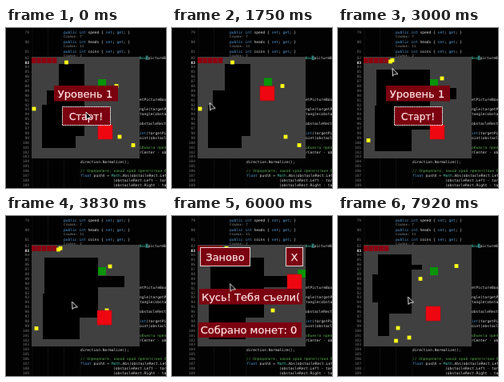
These frames come from a looping animation (200 px wide and 200 px high, 8 s). An HTML page:

```html
<!DOCTYPE html>
<html lang="ru">
<head>
<meta charset="utf-8">
<style>
html, body { margin: 0; width: 100%; height: 100%; overflow: hidden; background: #020202; }
svg { display: block; width: 100vw; height: 100vh; }
.code { font: 4.6px "DejaVu Sans Mono", monospace; fill: #d8d8d8; white-space: pre; }
.lens { font-size: 4.2px; fill: #8c8c8c; }
.num { fill: #777; text-anchor: end; }
.num.current { fill: #fff; font-weight: bold; }
.key { fill: #569cd6; }
.type { fill: #4ec9b0; }
.note { fill: #57a64a; }
.guide { stroke: #333; stroke-width: .5; stroke-dasharray: 1 1; }
.wall { fill: #000; }
.coin { fill: #ffff18; }
.panel { fill: #7b0010; }
.button { stroke: #e8d0d4; stroke-width: 1; }
.focus { stroke: #fff; stroke-dasharray: 1.5 .7; }
.label { font: 13px "DejaVu Sans", sans-serif; fill: #ffdfe2; stroke: #ffdfe2; stroke-width: .25; text-anchor: middle; }

.timed { animation: 8s step-end infinite; }
.moving { animation: 8s linear infinite; }
#mapA { animation-name: mapA; }
#mapB { animation-name: mapB; }
#mapC { animation-name: mapC; }
#taken { animation-name: taken; }
#intro { animation-name: intro; }
#lost { animation-name: lost; }
#player { animation-name: player; }
#enemy { animation-name: enemy; }
#cursor { animation-name: cursor; animation-timing-function: ease-in-out; }

@keyframes mapA { 0% { visibility: visible } 36%, 100% { visibility: hidden } }
@keyframes mapB { 0% { visibility: hidden } 36% { visibility: visible } 82.75%, 100% { visibility: hidden } }
@keyframes mapC { 0% { visibility: hidden } 82.75%, 100% { visibility: visible } }
@keyframes taken { 0% { opacity: 1 } 54.4%, 100% { opacity: 0 } }
@keyframes intro {
  0%, 36%, 82.75% { visibility: visible }
  5%, 46.875%, 95%, 100% { visibility: hidden }
}
@keyframes lost {
  0%, 36%, 82.75%, 100% { visibility: hidden }
  23.125%, 70% { visibility: visible }
}
@keyframes player {
  0%, 21.5% { transform: translate(120px, 69px) }
  23.1%, 35.99% { transform: translate(120px, 63px) }
  36%, 49% { transform: translate(120px, 69px) }
  54% { transform: translate(129px, 69px) }
  63%, 82.74% { transform: translate(162.5px, 72px) }
  82.75%, 100% { transform: translate(120px, 69px) }
}
@keyframes enemy {
  0%, 5% { transform: translate(124px, 130px) }
  12.5% { transform: translate(119px, 110px) }
  23.1%, 35.99% { transform: translate(119px, 78px) }
  36%, 46.8% { transform: translate(124px, 130px) }
  47.9% { transform: translate(123px, 127px) }
  55% { transform: translate(128px, 112px) }
  64.6% { transform: translate(142.5px, 98px) }
  70%, 82.74% { transform: translate(153px, 82px) }
  82.75%, 95% { transform: translate(124px, 130px) }
  99%, 100% { transform: translate(119px, 122px) }
}
@keyframes cursor {
  0%, 5% { transform: translate(100px, 105px) }
  12%, 17% { transform: translate(38px, 115px) }
  29.5%, 36% { transform: translate(67px, 47px) }
  45%, 71% { transform: translate(82.5px, 107px) }
  80%, 82.75% { transform: translate(58px, 52px) }
  85.4% { transform: translate(54.5px, 59px) }
  93.5%, 100% { transform: translate(87.5px, 101px) }
}
</style>
</head>
<body>
<svg viewBox="0 0 200 200" preserveAspectRatio="none">
  <defs>
    <rect id="coin" class="coin" x="-2.4" y="-2.4" width="4.8" height="4.8"/>
    <clipPath id="window"><rect x="32" y="36" width="135" height="127"/></clipPath>
  </defs>
  <path class="guide" d="M33 0V200M52.500 0V200M72.500 40V200M93 170V200"/>
  <g id="editor" class="code"></g>

  <g clip-path="url(#window)">
    <rect x="32" y="36" width="135" height="127" fill="#404040"/>
    <g id="mapA" class="timed">
      <path class="wall" d="M66 45H98V135H87V150H45V96H51V78H66Z"/>
      <g data-coins="35,101 75.5,43 138,72.5 142,136 159,146.5"></g>
    </g>
    <g id="mapB" class="timed">
      <path class="wall" d="M48 52H115V75H148V89H115V127H92V154H46V97H48Z"/>
      <g data-coins="126,118 38,140.5"></g>
      <g id="taken" class="timed" data-coins="130,63"></g>
    </g>
    <g id="mapC" class="timed">
      <path class="wall" d="M50 48H92V61H105V67H92V122H64V150H50V108H43V73H50Z"/>
      <g data-coins="148,62.5 103,78.5 75,140 89,152 72.5,156"></g>
    </g>
    <path d="M32 40.500H64" stroke="#8c0010" stroke-width="7" stroke-dasharray="5.7 .7"/>
    <g id="mapBCoins" class="timed" style="animation-name: mapB" data-coins="65.5,42 68,40.3"></g>
    <rect id="player" class="moving" x="-5" y="-5" width="10" height="10" fill="#089408"/>
    <rect id="enemy" class="moving" x="-9" y="-9" width="18" height="18" fill="#ee0710" stroke="#c00010" stroke-width=".5"/>

    <g id="intro" class="timed">
      <rect class="panel" x="60" y="72" width="80" height="19.500"/>
      <text class="label" x="99" y="86.500">Уровень 1</text>
      <rect class="panel button focus" x="70.500" y="98.500" width="60" height="23"/>
      <text class="label" x="100" y="114.500" style="font-size: 12px">Старт!</text>
    </g>
    <g id="lost" class="timed">
      <rect class="panel button" x="35.500" y="39.500" width="62" height="23"/>
      <text class="label" x="66.500" y="55.500">Заново</text>
      <rect class="panel button" x="142.500" y="39.500" width="21" height="23"/>
      <text class="label" x="153" y="56">X</text>
      <rect class="panel" x="34" y="91" width="129" height="19.500"/>
      <text class="label" x="98.500" y="105.500">Кусь! Тебя съели(</text>
      <rect class="panel" x="33" y="133" width="129" height="19"/>
      <text class="label" x="96" y="147">Собрано монет: 0</text>
    </g>
  </g>
  <path id="cursor" class="moving" d="M0 0L.5 9.500L3 7.300L7 7Z" fill="#080808" stroke="#fff" stroke-width=".9"/>
</svg>
<script>
const NS = "http://www.w3.org/2000/svg";
const editor = document.getElementById("editor");

function add(parent, tag, attrs, text = "") {
  const node = document.createElementNS(NS, tag);
  for (const name in attrs) node.setAttribute(name, attrs[name]);
  node.textContent = text;
  return parent.appendChild(node);
}

function codeLine(x, y, source) {
  const line = add(editor, "text", { x, y: y + 1.7 });
  for (const part of source.split(/(\/\/.*|\b(?:public|int|float|set|get)\b|\bMath\b|\bBox\b)/)) {
    const kind = part.startsWith("//") ? "note"
      : /^(public|int|float|set|get)$/.test(part) ? "key"
      : /^(Math|Box)$/.test(part) ? "type" : "";
    add(line, "tspan", { class: kind }, part);
  }
}

[["speed", 7], ["heads", 11], ["coins", 2]].forEach(([name, uses], i) => {
  const y = 5 + 12 * i;
  codeLine(72, y, `public int ${name} { set; get; }`);
  add(editor, "text", { class: "lens", x: 72, y: y + 7.3 }, `Ссылок: ${uses}`);
  add(editor, "text", { class: "num", x: 29, y: y + 1.7 }, 79 + i);
});

for (let n = 82; n < 110; n++) {
  const current = n === 83 ? " current" : "";
  add(editor, "text", { class: "num" + current, x: 29, y: 38.7 + (n - 82) * 5.89 }, n);
}

add(editor, "rect", { x: 174.5, y: 34.5, width: 3, height: 5.5, fill: "#176b65" });
codeLine(166.5, 37, "Box(pictureBox");
codeLine(167, 89, "etPictureBox,");
codeLine(167, 101, "ngle(targetPicture");
codeLine(167, 107, "tangle(obstaclePic");
codeLine(167, 119, "obstacleRect))");
codeLine(167, 131, "int(targetPicture");
codeLine(167, 137, "oint(obstaclePic");
add(editor, "text", { class: "note", x: 167, y: 150.7 }, "объекта препятствия");
codeLine(167, 155, "rCenter - obstacle");
codeLine(93, 167, "direction.Normalize();");
codeLine(93, 178, "// Определите, какой край препятствия ближе");
codeLine(93, 184, "float pushX = Math.Abs(obstacleRect.Left -");
codeLine(134, 190, "(obstacleRect.Left - target");
codeLine(134, 196, "(obstacleRect.Right - target");

for (const group of document.querySelectorAll("[data-coins]")) {
  for (const spot of group.dataset.coins.split(" ")) {
    const [x, y] = spot.split(",");
    add(group, "use", { href: "#coin", x, y });
  }
}
</script>
</body>
</html>
```
